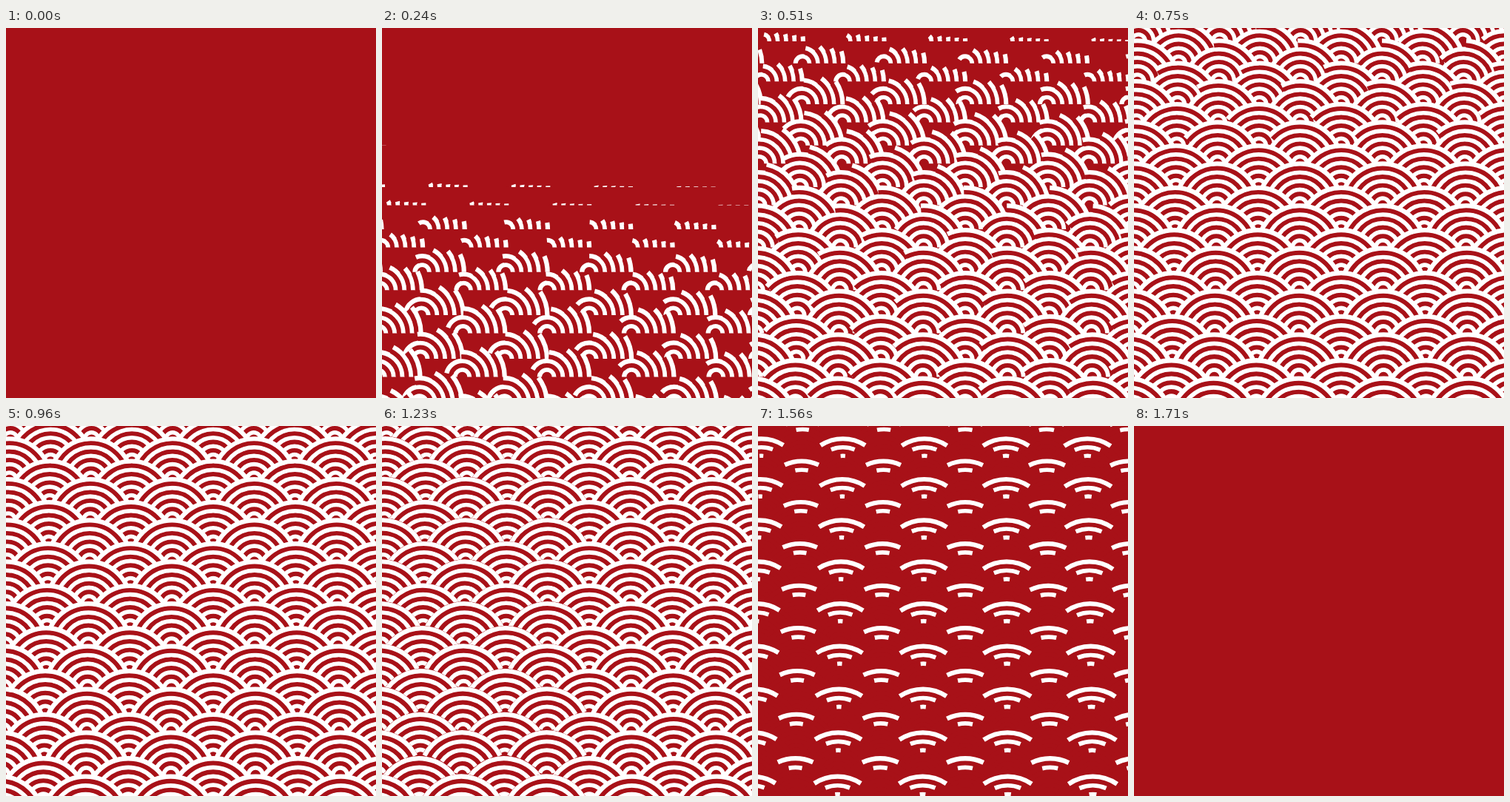
Animation of 500 by 500 pixels, one loop 1830 ms. Source, as an HTML page with a canvas:

```html
<!DOCTYPE html>
<html lang="en">
<head>
<meta charset="utf-8">
<title>Waves</title>
<style>
  html, body { margin: 0; width: 100%; height: 100%; overflow: hidden; background: #a81118; }
  canvas { display: block; width: 100vw; height: 100vh; }
</style>
</head>
<body>
<canvas width="500" height="500"></canvas>
<script>
const ctx = document.querySelector('canvas').getContext('2d');
const RED = '#a81118', WHITE = '#fff';
const LOOP = 1830, STEP = 30, RINGS = 5;
const DRAW_TIME = 720, ERASE_START = 1225, ERASE_TIME = 480;
const OUTER = 0.528;   // outer radius of a fan, relative to the column spacing

const clamp = v => Math.min(1, Math.max(0, v));
const easeInOut = v => (1 - Math.cos(Math.PI * clamp(v))) / 2;
const ringRadius = i => 0.087 + 0.1035 * i;

// Angles are measured counterclockwise from the right-hand base of the fan.
function strokeArc(fan, radius, width, from, to, color) {
  if (to <= from) return;
  ctx.beginPath();
  ctx.arc(fan.x, fan.y, radius * fan.size, -from, -to, true);
  ctx.lineWidth = width * fan.size;
  ctx.strokeStyle = color;
  ctx.stroke();
}

// Half angle of a ring left uncovered by the fans diagonally in front.
function visibleAngle(r, drop) {
  const dist = Math.hypot(0.5, drop);
  const reach = (r * r + dist * dist - OUTER * OUTER) / (2 * r * dist);
  return Math.atan2(drop, 0.5) + Math.asin(Math.min(1, reach));
}

function drawFan(fan, time) {
  const start = Math.max(185 - 60 * fan.row, 40 - 5 * fan.row) + 10 * fan.column;
  const grown = easeInOut((time - start) / DRAW_TIME) * Math.PI * ringRadius(RINGS - 1);
  const erased = clamp((time - ERASE_START - 3 * fan.column) / ERASE_TIME) ** 2 * 0.54;

  for (let i = 0; i < RINGS; i++) {
    const r = ringRadius(i);
    const sweep = Math.min(Math.PI, grown * (1 + 0.24 * (RINGS - 1 - i)) / r);
    let from = 0, to = sweep;
    if (erased > 0) {
      const half = visibleAngle(r, fan.drop) + (0.01 - erased) / r;
      from = Math.PI / 2 - half;
      to = Math.PI / 2 + half;
      if (erased >= 0.54) to = from;
    }
    const redWidth = i ? 0.057 : 0.062;
    const redRadius = i ? r - 0.052 : 0.031;
    strokeArc(fan, redRadius, redWidth, 0, sweep, RED);
    if (erased > 0) strokeArc(fan, r, 0.056, 0, sweep, RED);
    strokeArc(fan, r, 0.055, from, to, WHITE);
  }
}

function drawRow(row, shifted, time) {
  const y = 215 + 56.7 * row + 0.33 * row * row + (shifted ? 24.5 : 0);
  const size = 109.4 + 0.0105 * y;
  for (let n = -3; n <= 3; n++) {
    const offset = n + (shifted ? 0.5 : 0);
    drawFan({
      x: 280 + offset * size, y, size, row,
      column: offset + 2,
      drop: shifted ? 0.288 : 0.22
    }, time);
  }
}

function render(now) {
  const time = Math.floor((now % LOOP) / STEP) * STEP;
  ctx.fillStyle = RED;
  ctx.fillRect(0, 0, 500, 500);
  if (time > 0 && time < 1710) {
    for (let row = -4; row <= 6; row++) {
      drawRow(row, false, time);
      drawRow(row, true, time);
    }
  }
}

let origin;
function tick(now) {
  origin ??= now;
  render(now - origin);
  requestAnimationFrame(tick);
}
render(0);
requestAnimationFrame(tick);
</script>
</body>
</html>
```
